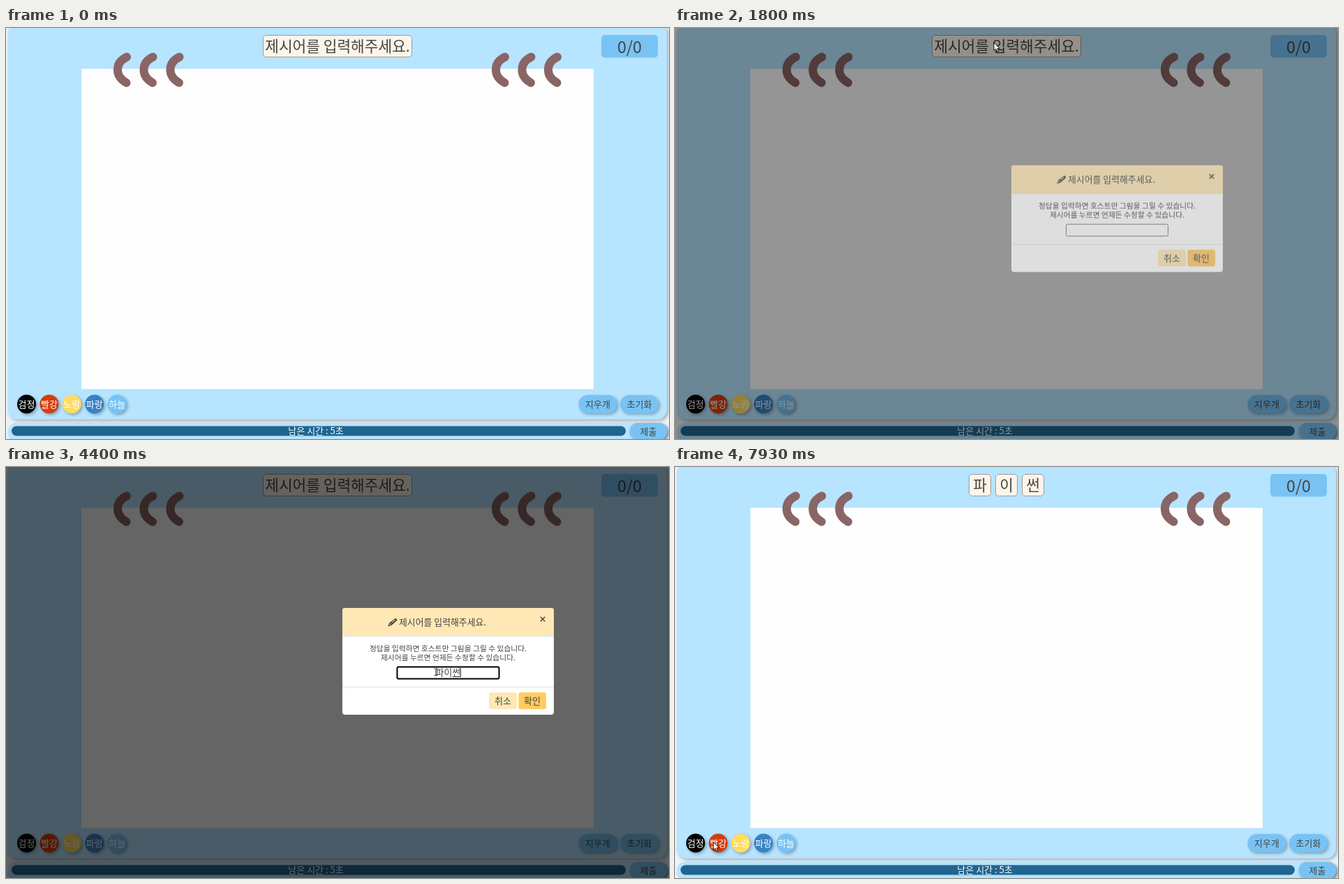
Recreate the animation shown at these times as an HTML page with a canvas. Size 950 px wide and 589 px high, loop 7990 ms.

```html
<!DOCTYPE html>
<html lang="ko">
<head>
<meta charset="utf-8">
<title>그림 맞히기</title>
<style>
html, body { margin: 0; width: 100%; height: 100%; overflow: hidden; }
canvas { display: block; }
</style>
</head>
<body>
<canvas id="stage" width="950" height="589"></canvas>
<script>
const W = 950, H = 589, LOOP = 7990;
const OPEN = 1697, BLUR = 5730, CLOSE = 5930, FOCUS = 2470;
const FONT = '"Noto Sans CJK KR", "Noto Sans KR", "Noto Sans", sans-serif';
const SKY = '#b7e4ff', BLUE = '#78c3f4', INK = '#444', CREAM = '#fdf5e9';

const screen = document.getElementById('stage').getContext('2d');
const sheet = document.createElement('canvas');
sheet.width = W;
sheet.height = H;
const layer = sheet.getContext('2d');

const PALETTE = [
  ['검정', '#000000'], ['빨강', '#d43c08'], ['노랑', '#fddc60'],
  ['파랑', '#3982c3'], ['하늘', BLUE]
];

// Text in the answer box while it is being composed.
const TYPING = [
  [0, ''], [3080, 'ㅍ'], [3140, '파'], [3610, '팡'], [3810, '파이'],
  [4070, '파있'], [4270, '파이써'], [4400, '파이썬']
];

// Pointer: time, x, y, shape used from that moment on.
const POINTER = [
  [530, 888, 577, 'arrow'], [650, 800, 430, 'arrow'], [800, 600, 170, 'arrow'],
  [930, 490, 52, 'arrow'], [1060, 454, 18, 'arrow'], [1260, 454, 18, 'arrow'],
  [1330, 457, 21, 'arrow'], [1860, 457, 21, 'arrow'], [1990, 530, 150, 'arrow'],
  [2110, 612, 268, 'beam'], [2200, 632, 307, 'beam'], [2330, 619, 298, 'beam'],
  [2420, 616, 293.5, 'beam'], [4900, 616, 293.5, 'beam'], [4990, 628, 308, 'arrow'],
  [5150, 692, 362, 'arrow'], [5350, 779, 406, 'arrow'], [5500, 776, 375, 'arrow'],
  [5590, 766, 346, 'hand'], [5670, 761, 331, 'hand'], [5920, 761, 331, 'hand'],
  [5930, 765, 322, 'arrow'], [6100, 765, 322, 'arrow'], [6200, 800, 295, 'arrow'],
  [6500, 800, 295, 'arrow'], [6660, 722, 328, 'arrow'], [6800, 562, 384, 'arrow'],
  [6900, 460, 437, 'arrow'], [7000, 350, 478, 'arrow'], [7130, 150, 540, 'arrow'],
  [7270, 36, 560, 'arrow'], [7400, 44, 552, 'arrow'], [7800, 55, 537.5, 'arrow']
];

const clamp = v => Math.max(0, Math.min(1, v));
const ramp = (t, from, to) => clamp((t - from) / (to - from));
const easeOut = v => 1 - Math.pow(1 - v, 1.8);

function box(g, x, y, w, h, r, fill, stroke, line = 1) {
  g.beginPath();
  g.roundRect(x, y, w, h, r);
  if (fill) { g.fillStyle = fill; g.fill(); }
  if (stroke) { g.strokeStyle = stroke; g.lineWidth = line; g.stroke(); }
}

function text(g, str, x, y, size, color = INK, weight = 400) {
  g.font = `${weight} ${size}px ${FONT}`;
  g.textAlign = 'center';
  g.fillStyle = color;
  g.fillText(str, x, y + size * 0.37);
}

function shaded(g, dx, blur, draw) {
  g.save();
  g.shadowColor = 'rgba(0,0,0,.3)';
  g.shadowOffsetX = g.shadowOffsetY = dx;
  g.shadowBlur = blur;
  draw();
  g.restore();
}

function pill(g, label, x, y, w, h) {
  shaded(g, 2, 4, () => box(g, x, y, w, h, h / 2, BLUE));
  text(g, label, x + w / 2, y + h / 2, 13);
}

function dotted(g, x, y, w, h) {
  g.setLineDash([1, 1]);
  box(g, x + .5, y + .5, w - 1, h - 1, 5, CREAM, '#5c4a4a');
  g.setLineDash([]);
}

function spring(g, dx) {
  g.beginPath();
  g.moveTo(173 + dx, 41.5);
  g.bezierCurveTo(155.7 + dx, 50, 155.7 + dx, 69, 172.5 + dx, 78.5);
  g.strokeStyle = '#8a6565';
  g.lineWidth = 12;
  g.lineCap = 'round';
  g.stroke();
  g.lineCap = 'butt';
}

function heading(g, t) {
  if (t >= CLOSE) {
    [...'파이썬'].forEach((ch, i) => {
      dotted(g, 421 + i * 38, 10, 32, 32);
      text(g, ch, 437 + i * 38, 26, 21.3);
    });
    return;
  }
  const scale = 1 - .06 * (ramp(t, 1530, 1650) - ramp(t, 1690, 1790));
  g.save();
  g.translate(475, 26.5);
  g.scale(scale, scale);
  dotted(g, -107, -16.5, 214, 32);
  text(g, '제시어를 입력해주세요.', 0, 0, 21.4);
  g.restore();
}

function board(g, t) {
  g.fillStyle = '#e9f3fa';
  g.fillRect(0, 0, W, H);
  shaded(g, 2, 5, () => box(g, 3, -6, 944, 567, 14, SKY));
  shaded(g, 2, 4, () => box(g, 3, 566, 944, 25, 12, SKY));
  g.fillStyle = '#fefefe';
  g.fillRect(108, 58.5, 734, 459);
  [0, 37.5, 75.5, 542, 579.5, 617].forEach(dx => spring(g, dx));
  heading(g, t);
  box(g, 853, 10, 81, 32.5, 5, BLUE);
  text(g, '0/0', 893.5, 27, 23.3);

  PALETTE.forEach(([name, color], i) => {
    const x = 29.5 + i * 32.4;
    shaded(g, 2, 4, () => box(g, x - 13.5, 525.5, 27, 27, 13.5, color));
    text(g, name, x, 539, 13, '#fff', 500);
  });
  pill(g, '지우개', 820.5, 526, 55, 26);
  pill(g, '초기화', 880, 526, 55, 26);
  box(g, 8, 570.5, 880, 14, 7, '#20658f');
  text(g, '남은 시간 : 5초', 444, 577.5, 13, '#fff', 500);
  pill(g, '제출', 893.5, 566, 54, 23.5);
}

function pen(g) {
  g.save();
  g.translate(547, 228.5);
  g.rotate(-.7);
  g.fillStyle = INK;
  g.beginPath();
  g.moveTo(0, 0);
  g.lineTo(5, -2.2);
  g.lineTo(15.5, -2);
  g.lineTo(17, 0);
  g.lineTo(15.5, 2);
  g.lineTo(5, 2.2);
  g.fill();
  g.fillStyle = '#ffe8b5';
  g.fillRect(3, -.4, 4, .8);
  g.fillRect(8.5, -.9, 5.5, 1);
  g.restore();
}

function answer(g, t) {
  const focused = t >= FOCUS && t < BLUR;
  if (focused) box(g, 560.5, 286.5, 146, 17, 2, '#fff', '#000', 2);
  else box(g, 560.5, 286.5, 146, 17, 2, '#fff', '#767676');

  const word = TYPING.filter(([at]) => t >= at).pop()[1];
  text(g, word, 633.5, 294, 13);
  if (!focused) return;
  const right = 633.5 + g.measureText(word).width / 2;
  g.fillStyle = '#333';
  g.fillRect(Math.round(right), 288, 1, 13);
  if (word) g.fillRect(right - 11.5, 300, 11.5, 1);
}

function dialog(g, t) {
  box(g, 482, 202, 303, 153, 4, '#fff');
  box(g, 482, 202, 303, 40, [4, 4, 0, 0], '#ffe8b5');
  g.fillStyle = '#dfe2e6';
  g.fillRect(482, 242, 303, 1);
  g.fillRect(482, 315, 303, 1);
  pen(g);
  text(g, '제시어를 입력해주세요.', 625.5, 222.5, 12.9, INK, 500);
  g.strokeStyle = INK;
  g.lineWidth = 1.5;
  g.beginPath();
  g.moveTo(765.7, 214.7);
  g.lineTo(772.3, 221.3);
  g.moveTo(772.3, 214.7);
  g.lineTo(765.7, 221.3);
  g.stroke();
  text(g, '정답을 입력하면 호스트만 그림을 그릴 수 있습니다.', 633.5, 260, 10.75, INK, 500);
  text(g, '제시어를 누르면 언제든 수정할 수 있습니다.', 633.5, 273, 10.75, INK, 500);
  answer(g, t);
  box(g, 692, 323, 40, 24, 3, '#ffe8b5');
  text(g, '취소', 712, 335, 13);
  box(g, 734.5, 323, 39.5, 24, 3, '#ffcb62');
  text(g, '확인', 754, 335, 13);
}

function popup(g, t) {
  if (t < OPEN || t >= CLOSE) return;
  const fade = ramp(t, OPEN, OPEN + 150);
  g.fillStyle = `rgba(0,0,0,${.6 * fade})`;
  g.fillRect(0, 0, W, H);
  layer.clearRect(0, 0, W, H);
  dialog(layer, t);
  g.globalAlpha = fade;
  g.drawImage(sheet, 0, -11.5 * (1 - easeOut(ramp(t, OPEN, OPEN + 300))));
  g.globalAlpha = 1;
}

const SHAPES = {
  arrow: new Path2D('M0 0V11.5L2.7 9L4.5 13L6.4 12.2L4.7 8.3H8.3Z'),
  hand: new Path2D('M-1.2 1Q0-.8 1.2 1V5.2Q2.3 4.4 3.2 5.6Q4.5 5 5.2 6.3Q6.8 6 7 7.5V10.5L5.5 13.5V15.5H-.8V13.8L-4.2 9.3Q-4.2 7.2-2.4 8.2L-1.2 9.4Z')
};

function pointer(g, t) {
  if (t < POINTER[0][0]) return;
  let i = POINTER.length - 1;
  while (POINTER[i][0] > t) i--;
  const [t0, x0, y0, shape] = POINTER[i];
  const [t1, x1, y1] = POINTER[i + 1] || [LOOP, x0, y0];
  const k = ramp(t, t0, t1);
  g.save();
  g.translate(x0 + (x1 - x0) * k, y0 + (y1 - y0) * k);
  if (shape === 'beam') {
    g.strokeStyle = '#222';
    g.lineWidth = 1;
    g.stroke(new Path2D('M-2.5-5H-1L0-4L1-5H2.5M0-4V4.5M-2.5 5.5H-1L0 4.5L1 5.5H2.5'));
  } else {
    g.fillStyle = '#fff';
    g.strokeStyle = '#111';
    g.lineWidth = 1;
    g.lineJoin = 'round';
    g.fill(SHAPES[shape]);
    g.stroke(SHAPES[shape]);
  }
  g.restore();
}

const start = performance.now();

function draw() {
  const t = (performance.now() - start) % LOOP;
  board(screen, t);
  popup(screen, t);
  pointer(screen, t);
  requestAnimationFrame(draw);
}
draw();
</script>
</body>
</html>
```
